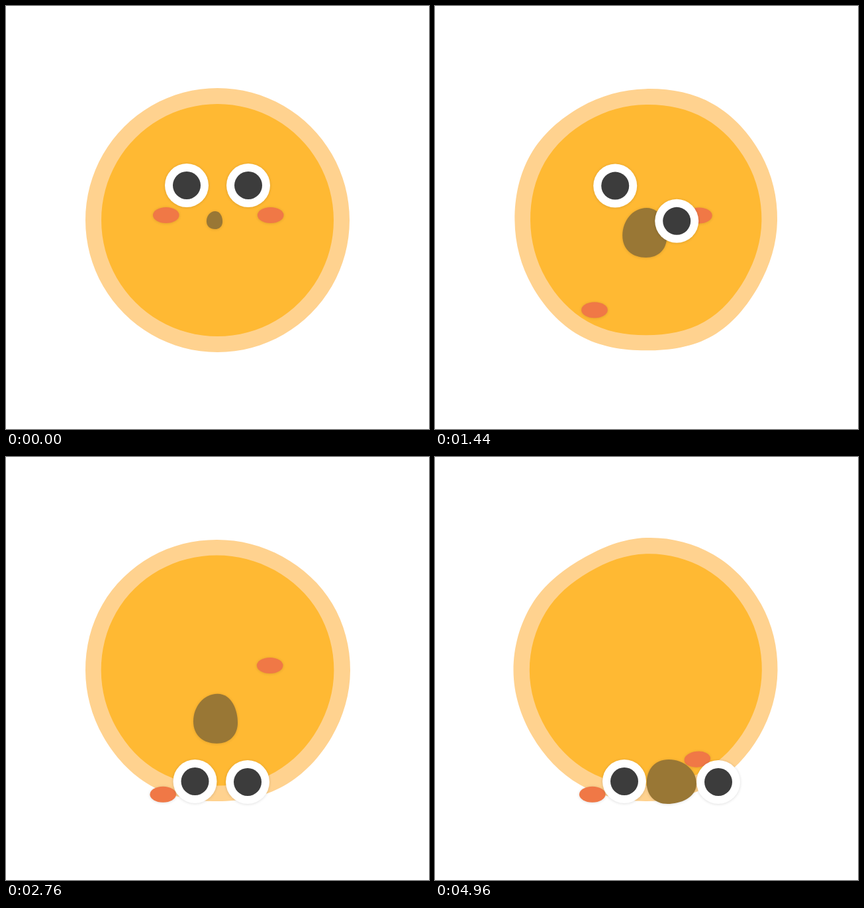
These frames come from a looping animation (639x639 px, 5000 ms). An HTML page with a canvas:

```html
<!DOCTYPE html>
<html lang="en">
<head>
<meta charset="utf-8">
<title>Wobbly face</title>
<style>
  html, body { margin: 0; height: 100%; overflow: hidden; background: #fff; }
  canvas { display: block; }
</style>
</head>
<body>
<canvas id="stage" width="639" height="639"></canvas>
<script>
const ctx = document.getElementById('stage').getContext('2d');
const LOOP = 5000, STEP = 40, GRAVITY = 0.0022;
const POINTS = 12;

// Wobble poses: time, shake x, shake y, then radius offsets clockwise from the right.
const poses = [
  [0, 0, 0, 0, 0, 0, 0, 0, 0, 0, 0, 0, 0, 0, 0],
  [1000, 0, 0, -1, -2, 1, -2, 1, -3, 3, 0, -3, 0, 1, 3],
  [1920, 0, 0, -1, -1, -2, -1, 0, -1, -2, -1, 2, 0, 3, 3],
  [2760, -1, -1, 2, 1, 2, -2, 1, -1, -1, 0, -1, -2, -1, 2],
  [3520, 0.5, 1, 1, 1, -3, 0, -2, 0, -2, -2, -4, 0, 0, 2],
  [4240, -1.8, -1.6, 1, 0, 0, -1, 0, 0, 0, 0, -4, 3, 0, 2],
  [4960, -0.5, -1, -1, -2, -1, -2, 0, -1, 1, 0, -5, 1, 3, 1]
];

const mouthPath = new Path2D('M-33.5 4C-33.5-18-18-37.5 3-37.5C25-37.5 33.5-12 33.5 6' +
  'C33.5 26 20 37.5 2 37.5C-18 37.5-33.5 26-33.5 4Z');

const mix = (a, b, u) => a + (b - a) * u;
const progress = (t, from, to) => Math.min(1, Math.max(0, (t - from) / (to - from)));
const ease = (t, from, to) => {
  const u = progress(t, from, to);
  return u * u * (3 - 2 * u);
};
const fall = (t, start, y, floor) =>
  Math.min(floor, y + GRAVITY / 2 * Math.max(0, t - start) ** 2);

function wobbleAt(t) {
  const k = Math.min(poses.length - 2, poses.filter(p => p[0] <= t).length - 1);
  const [a, b] = [poses[k], poses[k + 1]];
  const u = progress(t, a[0], b[0]);
  const jitter = Math.sin(Math.PI * u);
  const values = a.slice(1).map((v, i) => mix(v, b[i + 1], ease(u, 0, 1)) +
    (i < 2 ? 0.8 : 2) * jitter * Math.sin(i * 2.4 + t * 0.012));
  return { shake: values.slice(0, 2), offsets: values.slice(2) };
}

function blob(radius, offsets, amount, color) {
  const pts = offsets.map((d, i) => {
    const angle = i * 2 * Math.PI / POINTS;
    const r = radius + d * amount;
    return [319.5 + r * Math.cos(angle), 323.5 + r * Math.sin(angle)];
  });
  const at = i => pts[(i + POINTS) % POINTS];
  const handle = (i, side) =>
    [0, 1].map(c => at(i)[c] + side * (at(i + 1)[c] - at(i - 1)[c]) / 5.7);
  ctx.beginPath();
  ctx.moveTo(...pts[0]);
  for (let i = 0; i < POINTS; i++) {
    ctx.bezierCurveTo(...handle(i, 1), ...handle(i + 1, -1), ...at(i + 1));
  }
  ctx.fillStyle = color;
  ctx.fill();
}

function ellipse(x, y, rx, ry, color, angle = 0) {
  ctx.beginPath();
  ctx.ellipse(x, y, rx, ry, angle, 0, 2 * Math.PI);
  ctx.fillStyle = color;
  ctx.fill();
}

function softShadow(draw) {
  ctx.save();
  ctx.shadowColor = 'rgba(0, 0, 0, .14)';
  ctx.shadowBlur = 4;
  ctx.shadowOffsetY = 0.5;
  draw();
  ctx.restore();
}

function eye(x, y) {
  softShadow(() => ellipse(x, y, 33, 33, '#fff'));
  ellipse(x, y, 21, 21, '#3c3c3c');
}

function cheek(x, y, angle) {
  softShadow(() => ellipse(x, y, 19.8, 12, '#f07846', angle));
}

function mouth(t) {
  const open = 1 - (1 - progress(t, 0, 400)) ** 3;
  const wedge = ease(t, 2820, 2980);
  const scale = mix(0.36, 1, open);
  softShadow(() => {
    ctx.translate(mix(mix(315, 317.5, open), 357.8, wedge),
      fall(t, 2538, mix(323.5, 342, open), 491.5));
    ctx.rotate(wedge * Math.PI / 2);
    ctx.scale(scale, scale);
    ctx.fillStyle = '#997735';
    ctx.fill(mouthPath);
  });
}

function draw(t) {
  const { shake, offsets } = wobbleAt(t);
  const push = 22 * Math.sin(Math.PI * progress(t, 0, 320));
  const body = offsets.map((d, i) =>
    d + push * Math.max(0, Math.cos(i * Math.PI / 6 + 0.3)));

  ctx.clearRect(0, 0, 639, 639);
  ctx.save();
  ctx.translate(...shake);
  blob(199.5, body, 1, '#ffd28f');
  blob(175.5, body, 0.7, '#ffb933');

  const nudge = ease(t, 2000, 2120);
  const land = ease(t, 3890, 3980);
  cheek(mix(241.8, 238.2, nudge), fall(t, 1080, 316, 510.8), 0);
  cheek(mix(399.7, 396.8, land), fall(t, 3560, 316, 457.6), -0.09 * land);
  mouth(t);
  eye(mix(273, 286.5, nudge), fall(t, 1578, 271, 491));
  eye(mix(366, 428.5, ease(t, 2820, 2980)), fall(t, 1220, 271, 492));
  ctx.restore();
}

function tick() {
  const t = performance.now() % LOOP;
  draw(Math.floor(t / STEP) * STEP);
  requestAnimationFrame(tick);
}
tick();
</script>
</body>
</html>
```
